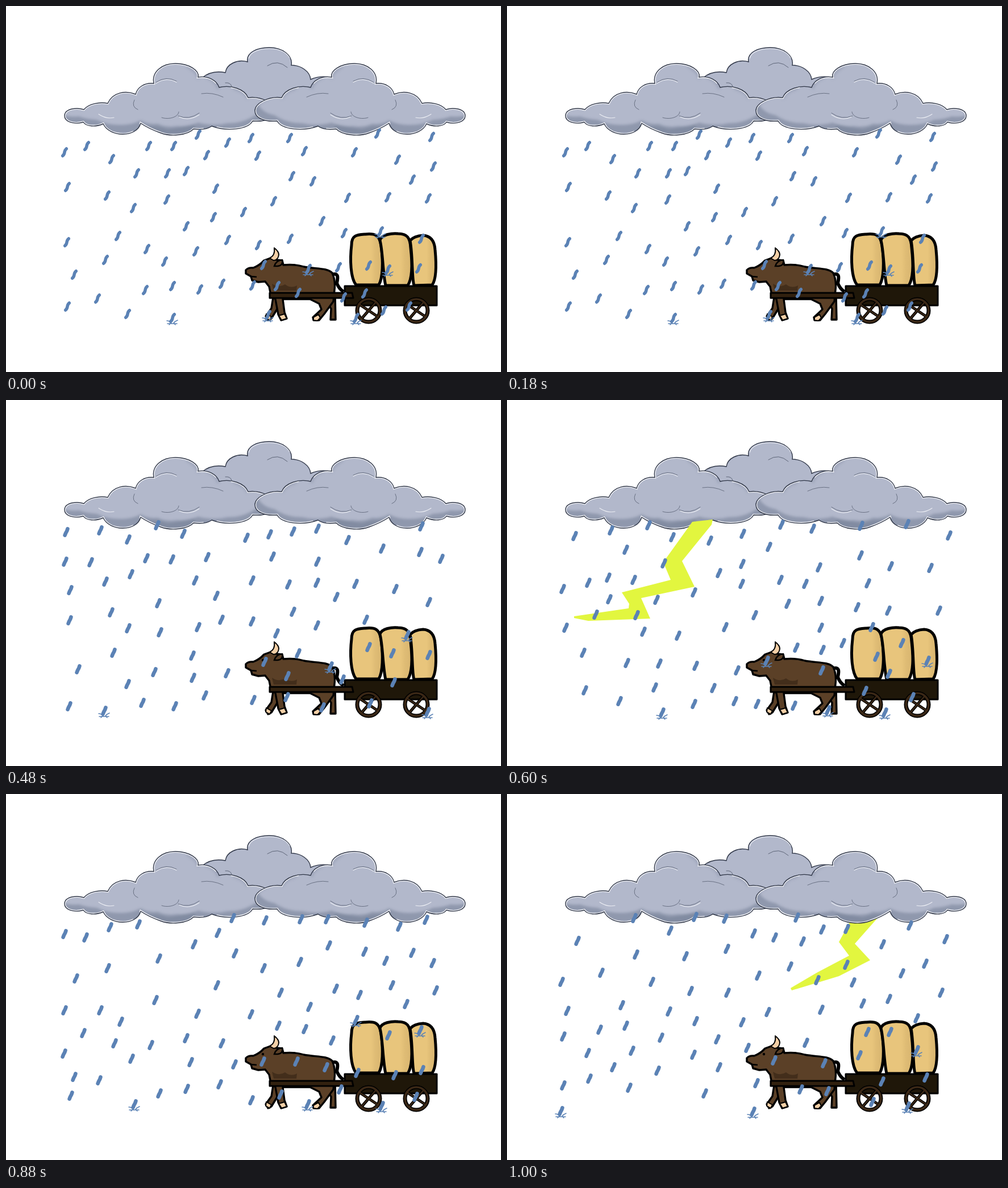
These frames come from a looping animation (871x643 px, 1100 ms). An HTML page:

```html
<!DOCTYPE html>
<html lang="en">
<head>
<meta charset="utf-8">
<title>Ox cart in the rain</title>
<style>
  html, body { margin: 0; width: 100%; height: 100%; overflow: hidden; background: #fff; }
  svg { display: block; }

  /* five hard-cut scenes at 0, 300, 600, 700 and 1000 ms */
  .scene { visibility: hidden; animation: 1100ms step-end infinite; }
  .s0 { animation-name: s0; }
  .s1 { animation-name: s1; }
  .s2 { animation-name: s2; }
  .s3 { animation-name: s3; }
  .s4 { animation-name: s4; }
  @keyframes s0 { 0% { visibility: visible } 27.2727% { visibility: hidden } }
  @keyframes s1 { 0% { visibility: hidden } 27.2727% { visibility: visible } 54.5454% { visibility: hidden } }
  @keyframes s2 { 0% { visibility: hidden } 54.5454% { visibility: visible } 63.6363% { visibility: hidden } }
  @keyframes s3 { 0% { visibility: hidden } 63.6363% { visibility: visible } 90.909% { visibility: hidden } }
  @keyframes s4 { 0% { visibility: hidden } 90.909% { visibility: visible } }

  #rain { fill: none; stroke: #5b82b5; stroke-linecap: round; stroke-linejoin: round; }
  .bolt { fill: #e2f63f; }
  .ink { fill: none; stroke: #3a4254; stroke-width: 1; stroke-linecap: round; }
  .gleam { fill: none; stroke: #eceef4; stroke-width: 1.1; stroke-linecap: round; }
  .shade { fill: #7d879d; }
  .ox { fill: #5b4027; stroke: #000; stroke-width: 3.4; stroke-linejoin: round; }
  .hoof { fill: #f3cfa6; stroke: #000; stroke-width: 2; stroke-linejoin: round; }
  .bale { fill: url(#straw); stroke: #000; stroke-width: 5; stroke-linejoin: round; }
  .bed { fill: #1f1709; stroke: #000; stroke-width: 3; stroke-linejoin: round; }
  .shaft { fill: #32210f; stroke: #000; stroke-width: 3; stroke-linejoin: round; }
</style>
</head>
<body>
<svg width="871" height="643" viewBox="0 0 871 643">
  <defs>
    <filter id="soft" x="-10%" y="-30%" width="120%" height="160%"><feGaussianBlur stdDeviation="2"/></filter>
    <linearGradient id="straw">
      <stop offset="0" stop-color="#e8c57c"/>
      <stop offset=".64" stop-color="#e8c57c"/>
      <stop offset=".78" stop-color="#dfbc75"/>
      <stop offset="1" stop-color="#d8b56f"/>
    </linearGradient>

    <path id="puff" d="M103 193C103 184 113 180 125 180Q131 180 137 182C145 172 164 168 179 171
      C188 151 211 148 228 155C231 143 244 134 260 136C256 116 274 101 298 101C323 101 341 114 338 125
      C356 122 371 131 375 143C396 138 420 146 426 161C449 158 473 171 473 184C473 196 458 204 434 202
      C426 217 389 221 362 211Q351 219 330 216C320 227 290 230 272 223Q252 216 237 206
      C230 232 182 231 171 207C158 213 141 212 136 204C119 209 103 203 103 193Z"/>
    <clipPath id="puffClip"><use href="#puff"/></clipPath>

    <g id="cloud">
      <use href="#puff" fill="#b2b8cb"/>
      <g clip-path="url(#puffClip)">
        <g filter="url(#soft)">
          <path class="shade" opacity=".65" d="M100 191Q112 196 128 194Q142 199 160 200Q176 209 202 209Q222 209 237 201
            Q251 209 267 207Q281 214 301 211Q322 212 338 205Q365 212 390 206Q418 206 438 192
            Q460 188 468 172L480 170V215L440 224H100Z"/>
          <path class="shade" opacity=".75" d="M240 212Q266 210 284 217Q310 214 332 208V224L300 234Z"/>
          <path fill="none" stroke="#8991a8" stroke-width="4" opacity=".5" d="M318 106Q338 117 338 128
            M353 126Q371 133 373 146M400 145Q422 151 425 163M452 163Q471 171 472 186"/>
        </g>
        <use href="#puff" fill="none" stroke="#f4f5f9" stroke-width="4" stroke-dasharray="330 30 210 24 120 18"/>
      </g>
      <use href="#puff" fill="none" stroke="#2f3647" stroke-width="1.4"/>
      <path class="ink" opacity=".6" d="M264 134Q282 122 300 132M344 154Q363 151 382 160M274 196C285 200 303 196 304 186
        M303 193Q322 201 340 188M226 165Q220 177 232 182"/>
      <path class="gleam" d="M264 136Q282 124 300 134M305 195Q322 203 340 191M163 190Q176 199 190 196"/>
    </g>
  </defs>

  <path class="bolt scene s4" d="M606 220L653 212 651 219 612 263 639 292 584 320 501 345 499 341 545 314 602 284 584 260Z"/>

  <g id="backCloud">
    <path fill="#b2b8cb" stroke="#2f3647" stroke-width="1.4" d="M344 127Q361 112 386 117C388 102 407 93 425 98
      C422 82 441 73 463 73C488 73 505 88 502 104C519 104 535 115 536 129Q553 121 576 126L560 170H400Z"/>
    <path class="gleam" d="M427 92C430 80 447 75 463 75C481 75 493 81 499 91"/>
    <path class="ink" opacity=".7" d="M460 105Q478 93 495 108M386 135Q395 134 397 141"/>
  </g>
  <use href="#cloud"/>
  <use href="#cloud" transform="matrix(-1 0 0 1 911 0)"/>

  <path class="bolt scene s2" d="M326 214L362 210 360 219 308 283 330 328 236 348 252 384 143 388 118 383 118 380 214 366 215 358 202 338 288 316 275 285Z"/>

  <g id="oxBody">
    <path fill="none" stroke="#000" stroke-width="6" d="M569 473C587 466 584 478 582 487Q586 497 594 502"/>
    <path class="ox" d="M470 512L467 531 457 545 461 552 467 549 481 526 484 511Z"/>
    <path class="hoof" d="M458 541L467 546 464 552 457 548Z"/>
    <path class="ox" d="M560 508L572 532 571 551H580L579 505Z"/>
    <path class="ox" d="M422 464Q426 459 435 460Q446 456 454 447L465 443 476 446 486 447 488 455
      Q508 453 524 458C546 462 566 460 574 469Q580 482 578 499L576 519 560 541 551 552H541L540 547
      555 533 551 523 535 515H487L490 538 494 549 484 552 479 542 474 515 466 508 463 493 456 484
      444 485 433 482 431 475 422 470Z"/>
    <path fill="#432e1b" d="M468 488Q480 496 491 489Q501 497 512 491L511 500H471Z"/>
    <path class="hoof" d="M480 544L490 541 494 549 485 552ZM541 547L550 542 553 548 548 553 541 552Z"/>
    <path class="hoof" d="M464 443Q474 438 472 425Q480 431 480 437Q479 446 471 447Z"/>
    <path fill="#5b4027" stroke="#000" stroke-width="2.4" d="M472 457Q475 447 486 446Q488 456 478 457Z"/>
    <path fill="none" stroke="#000" stroke-width="2.5" d="M429 475L441 476"/>
    <circle cx="452" cy="457" r="2.2"/>
  </g>

  <g id="cart">
    <path class="bale" d="M616 490C606 478 605 445 608 420C608 402 618 402 632 401C650 399 657 403 660 420C664 450 663 478 656 490Z"/>
    <path class="bale" d="M668 491C663 470 663 430 658 412C660 401 680 399 690 400C706 400 711 407 712 425C716 460 714 480 707 491Z"/>
    <path class="bale" d="M718 491C714 480 716 440 711 412Q718 404 734 403C748 404 754 413 755 428C758 460 757 480 750 490Z"/>
    <path class="bed" d="M596 492H758V526H596Z"/>
    <path class="shaft" d="M464 504H609L611 513H464Z"/>
    <g id="wheel" transform="translate(638 535)" fill="none">
      <circle r="20" stroke="#000" stroke-width="7"/>
      <path id="spokes" stroke="#000" stroke-width="5" d="M-15-10L15 10M12-14L-12 14"/>
      <circle r="20" stroke="#3b2816" stroke-width="3.6"/>
      <path stroke="#3b2816" stroke-width="2.4" d="M-18-12L18 12M14-16L-14 16"/>
    </g>
    <use href="#wheel" x="84"/>
  </g>

  <g id="rain"></g>
</svg>

<script>
  const NS = 'http://www.w3.org/2000/svg';
  const THIN = 'M3.2-6.2Q.5-4 0 0Q-.5 4-3.2 6.2';
  const FAT = 'M2.4-5.6L1.2-2L-1 2L-2.4 5.6';
  const SPLASH = 'M-10 5Q-5 5-2 9M-9 10H8M9 4Q4 6 2 9M-3 9L-6 12M2 9L5 12';

  // where drops burst on the ground, the ox and the bales
  const splashes = [
    [[293, 548], [461, 543], [532, 462], [616, 548], [659, 396], [672, 463]],
    [[173, 546], [571, 468], [706, 413], [742, 548]],
    [[273, 549], [457, 458], [565, 545], [665, 549], [740, 458]],
    [[226, 545], [531, 545], [616, 397], [661, 548], [729, 415]],
    [[95, 557], [433, 558], [705, 549], [721, 450]]
  ];
  const DROPS = 72;

  function seeded(seed) {
    return () => (seed = (seed * 16807) % 2147483647) / 2147483647;
  }

  // keep the candidate furthest from its neighbours for an even, irregular spread
  function scatter(start, rand) {
    const points = [...start];
    const gap = ([x, y]) => Math.min(...points.map(p => Math.hypot(p[0] - x, p[1] - y)));
    while (points.length < DROPS) {
      const tries = Array.from({ length: 12 }, () => {
        const y = 216 + rand() * 325;
        const right = 785 - (y - 216) * 0.15;
        return [95 + rand() * (right - 95), y];
      });
      points.push(tries.reduce((a, b) => gap(b) > gap(a) ? b : a));
    }
    return points;
  }

  function add(parent, tag, attrs) {
    const el = document.createElementNS(NS, tag);
    for (const name in attrs) el.setAttribute(name, attrs[name]);
    return parent.appendChild(el);
  }

  const rain = document.getElementById('rain');
  splashes.forEach((bursts, i) => {
    const group = add(rain, 'g', { class: 'scene s' + i });
    const stroke = (d, width, [x, y]) => add(group, 'path', {
      d, 'stroke-width': width, transform: `translate(${Math.round(x)} ${Math.round(y)})`
    });
    const [shape, width] = i ? [FAT, 6.6] : [THIN, 5.6];
    scatter(bursts, seeded(4201 + i * 977)).forEach(p => stroke(shape, width, p));
    bursts.forEach(p => stroke(SPLASH, 1.6, p));
  });
</script>
</body>
</html>
```
